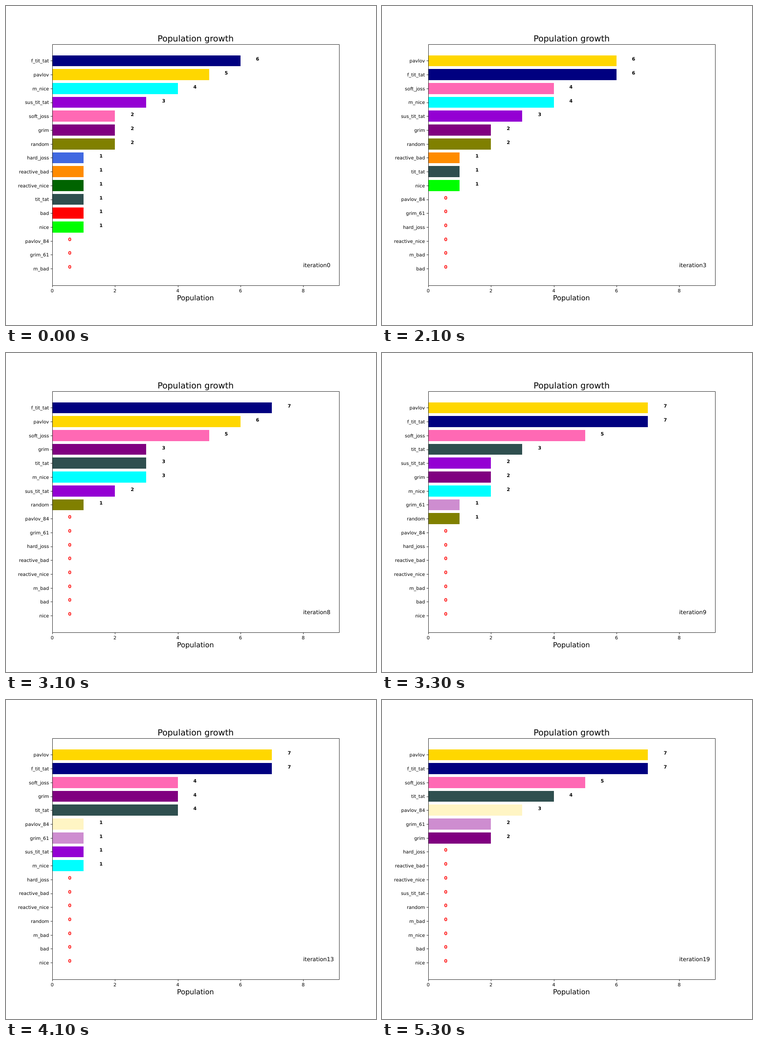
An HTML page that plays this animation: 792x684 px, repeating every 7000 ms.

```html
<!DOCTYPE html>
<html lang="en">
<head>
<meta charset="utf-8">
<title>Population growth</title>
<style>
html, body { margin: 0; width: 100%; height: 100%; overflow: hidden; background: #fff; }
svg { display: block; }
text { font-family: "DejaVu Sans", sans-serif; font-size: 10px; text-rendering: geometricPrecision; }
</style>
</head>
<body>
<svg id="stage" width="792" height="684" viewBox="0 0 792 684"></svg>
<script>
const LEFT = 99, UNIT = 67.15, STEP = 29.714, LOOP = 7000;
const svg = document.getElementById('stage');

// name, colour, starting count; later entries win ties
const species = [
  ['nice', '#00ff00', 1],
  ['bad', '#ff0000', 1],
  ['m_nice', '#00ffff', 4],
  ['m_bad', '#8b0000', 0],
  ['tit_tat', '#2f4f4f', 1],
  ['random', '#808000', 2],
  ['grim', '#800080', 2],
  ['sus_tit_tat', '#9400d3', 3],
  ['reactive_nice', '#006400', 1],
  ['reactive_bad', '#ff8c00', 1],
  ['hard_joss', '#4169e1', 1],
  ['soft_joss', '#ff69b4', 2],
  ['f_tit_tat', '#000080', 6],
  ['pavlov', '#ffd700', 5],
  ['grim_61', '#ce8dd0', 0],
  ['pavlov_84', '#fff5c4', 0]
].map(([name, color, count], order) => ({ name, color, count, order }));

// one entry per iteration: who loses a member > who gains it
const moves = [
  'bad>pavlov', 'reactive_nice>soft_joss', 'hard_joss>soft_joss', 'random>grim',
  'nice>soft_joss', 'm_nice>f_tit_tat', 'reactive_bad>tit_tat', 'sus_tit_tat>tit_tat',
  'm_nice>pavlov grim>grim_61', 'sus_tit_tat>pavlov', 'soft_joss>grim', 'random>grim',
  'm_nice>tit_tat pavlov>pavlov_84', 'f_tit_tat>soft_joss', 'm_nice>f_tit_tat',
  'soft_joss>pavlov_84', 'grim>grim_61', 'grim>soft_joss', 'sus_tit_tat>pavlov_84'
];

function ranked(counts) {
  return species
    .map(s => ({ ...s, count: counts[s.name] }))
    .sort((a, b) => b.count - a.count || b.order - a.order);
}

function history() {
  const counts = Object.fromEntries(species.map(s => [s.name, s.count]));
  const list = [ranked(counts)];
  for (const move of moves) {
    for (const pair of move.split(' ')) {
      const [loser, winner] = pair.split('>');
      counts[loser]--;
      counts[winner]++;
    }
    list.push(ranked(counts));
  }
  return list;
}

function add(tag, attrs, content = '') {
  const el = document.createElementNS('http://www.w3.org/2000/svg', tag);
  for (const key in attrs) el.setAttribute(key, attrs[key]);
  el.textContent = content;
  svg.appendChild(el);
  return el;
}

const label = (x, y, content, size = 10, anchor = 'start') =>
  add('text', { x, y, 'text-anchor': anchor, style: `font-size:${size}px` }, content);
const line = d => add('path', { d, fill: 'none', stroke: '#000', 'stroke-width': 0.8 });
const toX = v => LEFT + UNIT * v;

const rows = species.map((_, i) => {
  const y = 117.44 + STEP * i;
  const top = Math.round(y - STEP * 0.4);
  const height = Math.round(y + STEP * 0.4) - top;
  return {
    bar: add('rect', { x: LEFT, y: top, height, width: 0 }),
    name: label(92, Math.round(y + 3.8), '', 10, 'end'),
    value: add('text', { y: Math.round(y), 'font-weight': 'bold' }),
    tick: line(`M95.5 ${Math.round(y) + 0.5}H99`)
  };
});

line('M99.5 82.5H713.5V599.5H99.5Z');
for (let v = 0; v <= 8; v += 2) {
  line(`M${Math.round(toX(v)) + 0.5} 599.5v3.5`);
  label(toX(v), 614, v, 10, 'middle');
}
label(405.9, 76, 'Population growth', 18, 'middle');
label(405.5, 631, 'Population', 15, 'middle');
const counter = label(636, 560, '', 12);

const states = history();
let shown = -1;

function draw(t) {
  const step = t < 1700 ? 0 : Math.min(moves.length, 1 + Math.floor((t - 1700) / 200));
  if (step === shown) return;
  shown = step;
  states[step].forEach((s, i) => {
    const { bar, name, value } = rows[i];
    bar.setAttribute('width', Math.round(toX(s.count)) - LEFT);
    bar.setAttribute('fill', s.color);
    name.textContent = s.name;
    value.textContent = s.count;
    value.setAttribute('x', Math.round(toX(s.count + 0.5)));
    value.setAttribute('fill', s.count ? '#000' : '#f00');
  });
  counter.textContent = 'iteration' + step;
}

const start = performance.now();
function tick() {
  draw((performance.now() - start) % LOOP);
  requestAnimationFrame(tick);
}
draw(0);
requestAnimationFrame(tick);
</script>
</body>
</html>
```
